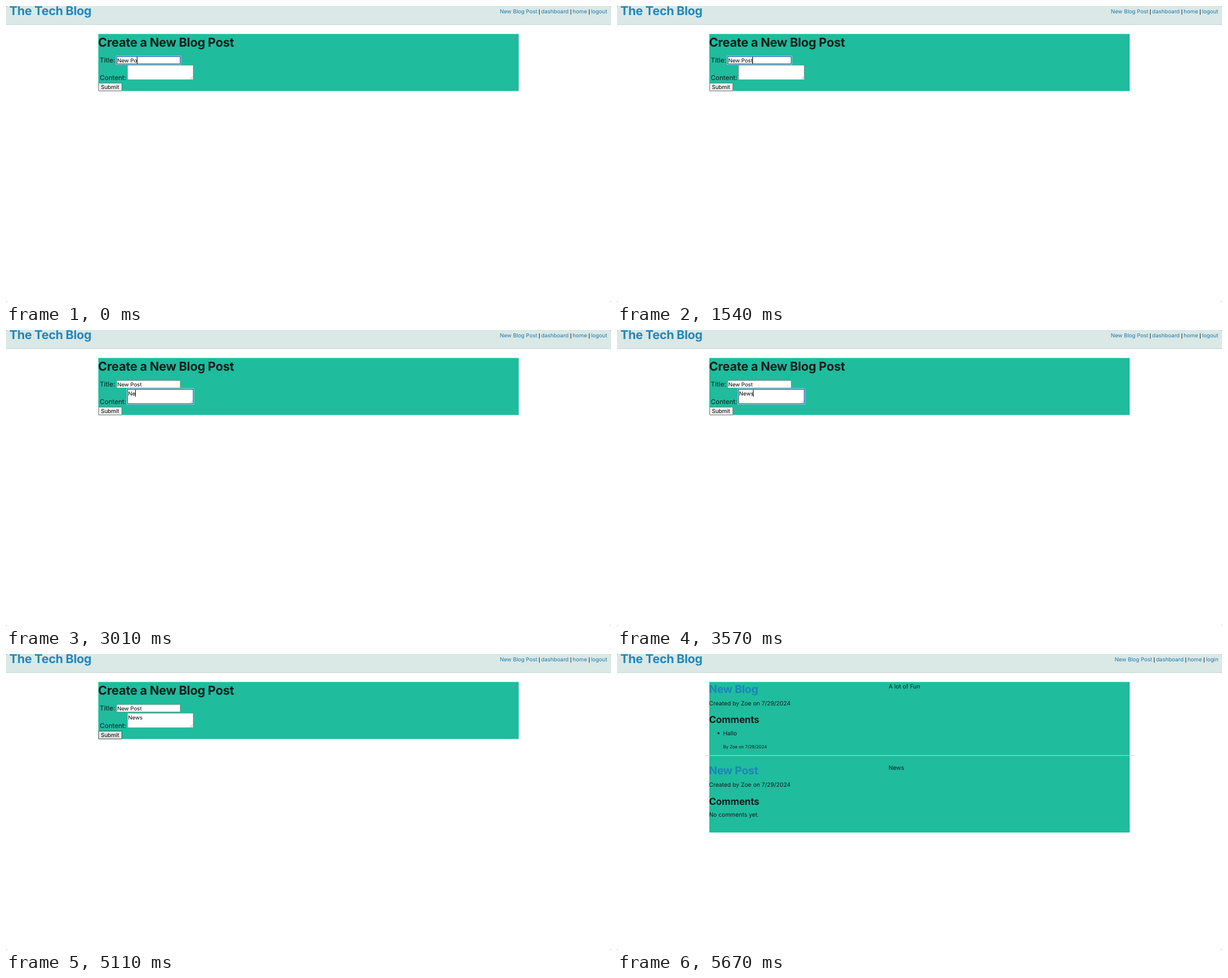
Animation, 1068 px wide and 524 px high, one loop 8 s. Source, as an HTML page:

```html
<!DOCTYPE html>
<html lang="en">
<head>
<meta charset="utf-8">
<title>Blog post form</title>
<style>
  html, body { margin: 0; width: 100%; height: 100%; overflow: hidden; background: #fff; }
  svg { display: block; }
  text {
    font: 10.26px Inter, sans-serif;
    font-optical-sizing: none;
    text-rendering: geometricPrecision;
    fill: #141c1a;
    white-space: pre;
  }
  .brand, .h1, .h2, .h3 { font-weight: 700; letter-spacing: -.0125em; }
  .brand { font-size: 21.4px; fill: #2187bb; }
  .h1 { font-size: 21.7px; }
  .h2 { font-size: 19.3px; fill: #1d85b8; }
  .h3 { font-size: 16.9px; letter-spacing: -.008em; }
  .nav { font-size: 9.6px; }
  .link { fill: #1c7aab; }
  .label { font-size: 11.55px; }
  .field { font-size: 9.55px; fill: #000; }
  .button { font-size: 9.75px; fill: #000; }
  .small { font-size: 7.7px; }
</style>
</head>
<body>
<svg id="stage" width="1068" height="524" viewBox="0 0 1068 524">
  <rect width="1068" height="33" fill="#dae8e6"/>
  <rect y="32.6" width="1068" height=".9" fill="#c5cfcd"/>
  <path d="M0 0h2L0 2zM1068 0v2l-2-2zM0 524v-2l2 2zM1068 524h-2l2-2z" fill="#b5bbba"/>
</svg>
<script>
const LOOP = 8000;
const GREEN = '#1fbc9e';
const stage = document.getElementById('stage');

function add(parent, tag, attrs, content = '') {
  const el = document.createElementNS('http://www.w3.org/2000/svg', tag);
  for (const key in attrs) el.setAttribute(key, attrs[key]);
  el.textContent = content;
  parent.append(el);
  return el;
}
const group = () => add(stage, 'g', {});
const rect = (g, x, y, width, height, fill) => add(g, 'rect', { x, y, width, height, fill });
const text = (g, x, y, content, style = '') => add(g, 'text', { x, y, class: style }, content);
const show = (el, on) => el.setAttribute('visibility', on ? 'visible' : 'hidden');

function navigation(g, shift, last) {
  const links = [[871.7, 'New Blog Post'], [944.8, 'dashboard'], [1000.3, 'home'], [1032.8, last]];
  for (const [x, label] of links) text(g, x + shift, 13.4, label, 'nav link');
  for (const x of [941, 996.6, 1029]) rect(g, x + shift, 6, 1, 9.2, '#222');
}

// A bordered input with a focus ring, its text and a caret.
function field(g, x, y, w, h, textX, baseline, caretY) {
  const ring = add(g, 'rect', { x: x - 1, y: y - 1, width: w + 2, height: h + 2, rx: 1.5, fill: '#fff' });
  const box = add(g, 'rect', { x: x + .4, y: y + .4, width: w - .8, height: h - .8, fill: '#fff' });
  const value = text(g, textX, baseline, '', 'field');
  const caret = rect(g, 0, caretY, 1, 12, '#000');
  return (content, focused, caretX) => {
    show(ring, focused);
    box.setAttribute('stroke', focused ? '#1257a9' : '#767f7c');
    box.setAttribute('stroke-width', focused ? 1.4 : .7);
    value.textContent = content;
    show(caret, focused && caretX > 0);
    caret.setAttribute('x', caretX);
  };
}

text(stage, 6, 16, 'The Tech Blog', 'brand');

const form = group();
navigation(form, 0, 'logout');
rect(form, 163, 49.5, 742, 101, GREEN);
text(form, 162.5, 71.6, 'Create a New Blog Post', 'h1');
text(form, 165.6, 99.6, 'Title:', 'label');
text(form, 165.6, 131, 'Content:', 'label');
const setTitle = field(form, 195, 89, 113, 14, 196.5, 99.5, 90);
const setContent = field(form, 214, 104.5, 117, 26.5, 215.6, 115.6, 106);
add(form, 'path', { d: 'M325 129.5l4.5-4.5M327.7 129.5l1.8-1.8', stroke: '#888', 'stroke-width': .7 });
const button = add(form, 'rect', { x: 163.5, y: 136.5, width: 41, height: 13.8, rx: .5 });
text(form, 167.5, 147, 'Submit', 'button');

const posts = group();
navigation(posts, 6.85, 'login');
rect(posts, 163, 49.5, 742, 266.5, GREEN);
rect(posts, 155, 179.2, 759, 1, '#c5d3ce');

function post(y, title, body) {
  text(posts, 162.2, y + 19.6, title, 'h2');
  text(posts, 162.6, y + 41, 'Created by Zoe on 7/29/2024');
  text(posts, 162.5, y + 72.9, 'Comments', 'h3');
  text(posts, 479.5, y + 11.6, body);
}
post(49.5, 'New Blog', 'A lot of Fun');
add(posts, 'circle', { cx: 179.2, cy: 140.2, r: 1.6, fill: '#141c1a' });
text(posts, 187.2, 143.5, 'Hallo');
text(posts, 187.4, 167.4, 'By Zoe on 7/29/2024', 'small');
post(193.7, 'New Post', 'News');
text(posts, 162.4, 287.9, 'No comments yet.');

// start time, focused field, title, content, caret x (0 = hidden), button state
const STEPS = [
  [0, 'title', 'New Po', '', 231, 'idle'],
  [70, 'title', 'New Pos', '', 236, 'idle'],
  [350, 'title', 'New Post', '', 239, 'idle'],
  [840, 'title', 'New Post', '', 0, 'idle'],
  [1400, 'title', 'New Post', '', 239, 'idle'],
  [1820, 'content', 'New Post', '', 216, 'idle'],
  [2380, 'content', 'New Post', '', 0, 'idle'],
  [2660, 'content', 'New Post', 'N', 222, 'idle'],
  [3010, 'content', 'New Post', 'Ne', 228, 'idle'],
  [3290, 'content', 'New Post', 'New', 235, 'idle'],
  [3570, 'content', 'New Post', 'News', 240, 'idle'],
  [4130, 'content', 'New Post', 'News', 0, 'idle'],
  [4480, 'content', 'New Post', 'News', 0, 'hover'],
  [4620, 'content', 'New Post', 'News', 240, 'hover'],
  [4970, '', 'New Post', 'News', 0, 'press'],
  [5110, '', 'New Post', 'News', 0, 'hover'],
  [5600, 'posts'],
];
const BUTTON = {
  idle: ['#efefef', '#767676'],
  hover: ['#e3e3e3', '#4f4f4f'],
  press: ['#f5f5f5', '#8d8d8d'],
};

let current;
function render(time) {
  const step = STEPS.findLast(s => s[0] <= time);
  if (step === current) return;
  current = step;
  const [, focus, title, content, caret, state] = step;
  const listing = focus === 'posts';
  form.setAttribute('display', listing ? 'none' : 'inline');
  posts.setAttribute('display', listing ? 'inline' : 'none');
  if (listing) return;
  setTitle(title, focus === 'title', caret);
  setContent(content, focus === 'content', caret);
  const [fill, stroke] = BUTTON[state];
  button.setAttribute('fill', fill);
  button.setAttribute('stroke', stroke);
}

const start = performance.now();
function tick() {
  render((performance.now() - start) % LOOP);
  requestAnimationFrame(tick);
}
tick();
</script>
</body>
</html>
```
